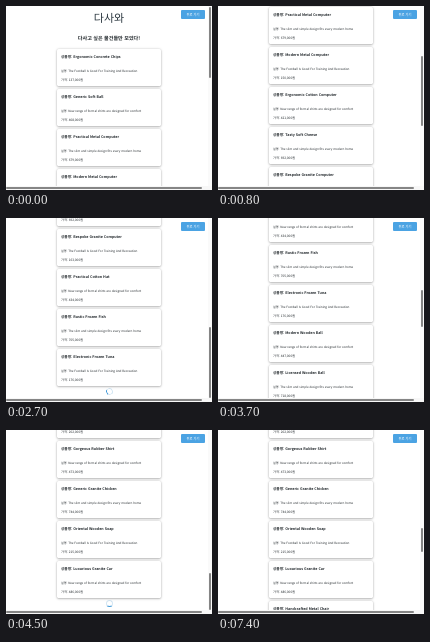
Animation, 206 px wide and 184 px high, one loop 7.6 s. Source, as an HTML page:

```html
<!DOCTYPE html>
<html lang="ko">
<head>
<meta charset="utf-8">
<style>
html, body { margin: 0; width: 100%; height: 100%; overflow: hidden; background: #fff; }
body { position: relative; color: #22282c; font-family: "Noto Sans CJK KR", "Noto Sans CJK", "Noto Sans", sans-serif; text-rendering: geometricPrecision; }
div, h1, h2, button { position: absolute; margin: 0; white-space: nowrap; box-sizing: border-box; }
#page { left: 0; top: 0; width: 206px; }
h1, h2 { left: 0; width: 206px; text-align: center; }
h1 { top: 4px; font: 500 11px/16px inherit; font-size: 11px; line-height: 16px; font-weight: 500; color: #2c3840; }
h2 { top: 29px; font-size: 5.1px; line-height: 8px; font-weight: 700; }
.card { left: 51px; width: 104px; height: 37px; border-radius: 1.5px; background: #fff; box-shadow: 0 .6px 2.2px rgba(0, 0, 0, .42); }
.card div { left: 4px; font-size: 3px; line-height: 6px; }
.card .name { top: 6px; font-size: 3.65px; font-weight: 700; }
.card .info { top: 19px; }
.card .price { top: 28px; font-size: 3.2px; }
#spin { left: 99.5px; width: 7px; height: 7px; border: 1px solid #d3e6f3; border-top-color: #3f98d8; border-radius: 50%; }
button { left: 175px; top: 4px; width: 24px; height: 9px; padding: 0; border: 0; border-radius: 1px; background: #4ba3e3; color: #fff; font: inherit; font-size: 3.3px; line-height: 9px; }
.bar { background: #858585; border-radius: 1px; }
#across { left: 0; top: 181px; width: 196px; height: 2px; }
#thumb { left: 203px; width: 2px; }
#foot { left: 0; top: 180px; width: 206px; height: 4px; background: #f7f7f7; }
#track { left: 202px; top: 0; width: 4px; height: 184px; background: #fafafa; }
</style>
</head>
<body>
<div id="page">
  <h1>다사와</h1>
  <h2>다사고 싶은 물건들만 모았다!</h2>
  <div id="spin"></div>
</div>
<button>위로 가기</button>
<div id="track"></div>
<div id="foot"></div>
<div id="across" class="bar"></div>
<div id="thumb" class="bar"></div>
<script>
const LOOP = 7600, STEP = 100, PITCH = 40, VIEW = 180;
const names = `Ergonomic Concrete Chips,Generic Soft Ball,Practical Metal Computer,Modern Metal Computer,
Ergonomic Cotton Computer,Tasty Soft Cheese,Bespoke Granite Computer,Practical Cotton Hat,Rustic Frozen Fish,
Electronic Frozen Tuna,Modern Wooden Ball,Licensed Wooden Ball,Handmade Soft Chair,Elegant Cotton Gloves,
Incredible Granite Bacon,Incredible Frozen Computer,Gorgeous Rubber Shirt,Generic Granite Chicken,
Oriental Wooden Soap,Luxurious Granite Car,Handcrafted Metal Chair`.split(/,\s*/);
const infos = [
  'The Football Is Good For Training And Recreation',
  'New range of formal shirts are designed for comfort',
  'The slim and simple design fits every modern home'
];
// [time, scroll position]
const path = [[0, 0], [300, 30], [800, 122], [1500, 272], [3000, 272], [3400, 290],
  [3700, 336], [4100, 597], [4400, 672], [LOOP, 672]];

const $ = id => document.getElementById(id);
const page = $('page'), spin = $('spin'), thumb = $('thumb');

function add(parent, cls, text = '') {
  const el = document.createElement('div');
  el.className = cls;
  el.textContent = text;
  return parent.appendChild(el);
}

const cards = names.map((name, i) => {
  const card = add(page, 'card');
  card.style.top = 43 + PITCH * i + 'px';
  add(card, 'name', '상품명: ' + name);
  add(card, 'info', '설명: ' + infos[i % infos.length]);
  add(card, 'price', `가격: ${137 + i * 271 % 800},000원`);
  return card;
});

function scrollAt(t) {
  const i = path.findIndex(p => p[0] > t);
  const [t0, y0] = path[i - 1], [t1, y1] = path[i];
  return y0 + (y1 - y0) * (t - t0) / (t1 - t0);
}

function draw(now) {
  const t = Math.floor(now % LOOP / STEP) * STEP;
  const count = t < 2900 ? 10 : t < 6000 ? 20 : 30;
  const height = 52 + PITCH * count, y = scrollAt(t);
  page.style.transform = `translateY(${-y}px)`;
  cards.forEach((card, i) => card.hidden = i >= count);
  spin.style.top = height - 10 + 'px';
  spin.style.transform = `rotate(${t * .36}deg)`;
  thumb.style.top = 1 + y / height * VIEW + 'px';
  thumb.style.height = VIEW * VIEW / height - 1 + 'px';
  requestAnimationFrame(draw);
}
draw(0);
</script>
</body>
</html>
```
